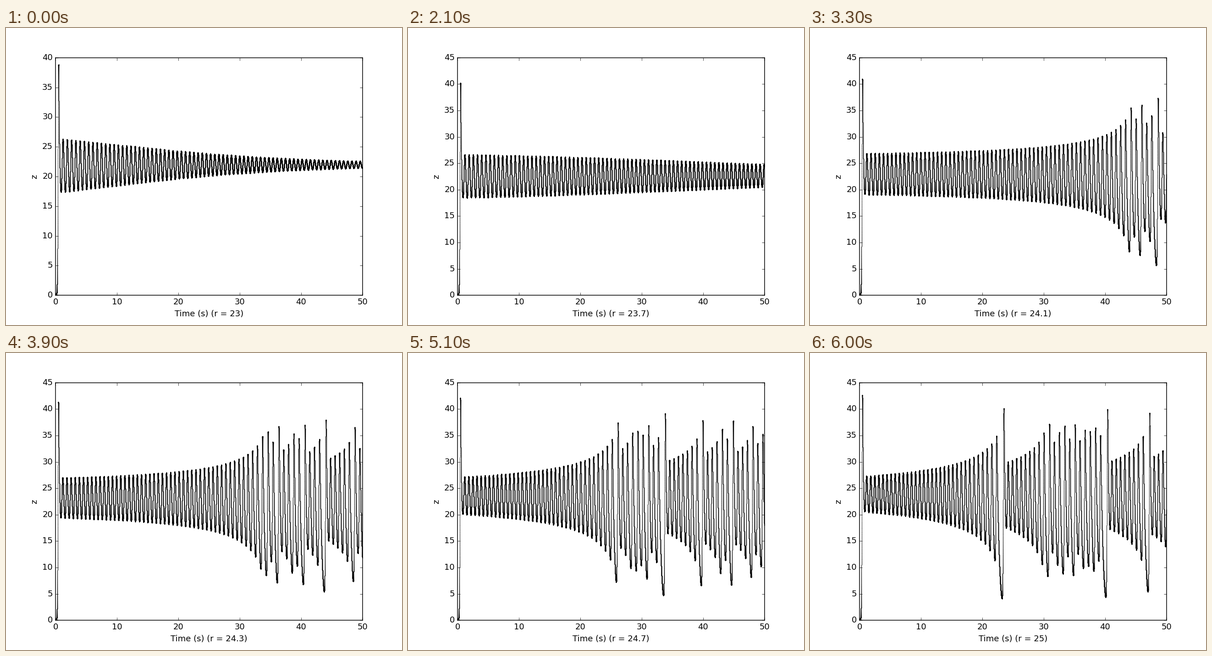
A matplotlib script for the animation above (6.3 s loop, 864 px wide and 648 px high).

```python
import matplotlib.pyplot as plt
import numpy as np
from matplotlib.animation import FuncAnimation

plt.style.use("classic")
plt.rcParams.update({
    "font.family": "DejaVu Sans",
    "figure.facecolor": "white",
    "savefig.facecolor": "white",
    "savefig.dpi": "figure",
})

SIGMA, BETA = 10.0, 8.0 / 3.0
R = np.round(np.linspace(23, 25, 21), 1)
T_END, DT = 50, 0.0001
STEPS = round(T_END / DT)


def solve():
    """Integrate the Lorenz system for every r at once with Euler steps."""
    x, y, z = np.zeros_like(R), np.ones_like(R), np.zeros_like(R)
    out = np.empty((STEPS + 1, len(R)))
    out[0] = z
    for i in range(1, STEPS + 1):
        x, y, z = (x + DT * SIGMA * (y - x),
                   y + DT * (x * (R - z) - y),
                   z + DT * (x * y - BETA * z))
        out[i] = z
    return out


t = np.linspace(0, T_END, STEPS + 1)
z_all = solve()

fig, ax = plt.subplots(figsize=(8, 6), dpi=108)
# Faint dense dots: slow stretches build up to black, fast ones stay grey.
dots, = ax.plot([], [], "ko", markersize=0.9, markeredgewidth=0, alpha=0.25)
ax.set_xlim(0, T_END)
ax.set_ylabel("z")


def update(i):
    z = z_all[:, i]
    top = 5 * int(np.ceil(z.max() / 5))
    dots.set_data(t, z)
    ax.set_ylim(0, top)
    ax.set_yticks(range(0, top + 1, 5))
    ax.set_xlabel(f"Time (s) (r = {R[i]:g})")
    return dots,


anim = FuncAnimation(fig, update, frames=len(R), interval=300,
                     repeat=True, repeat_delay=0, blit=False)
plt.show()
```
